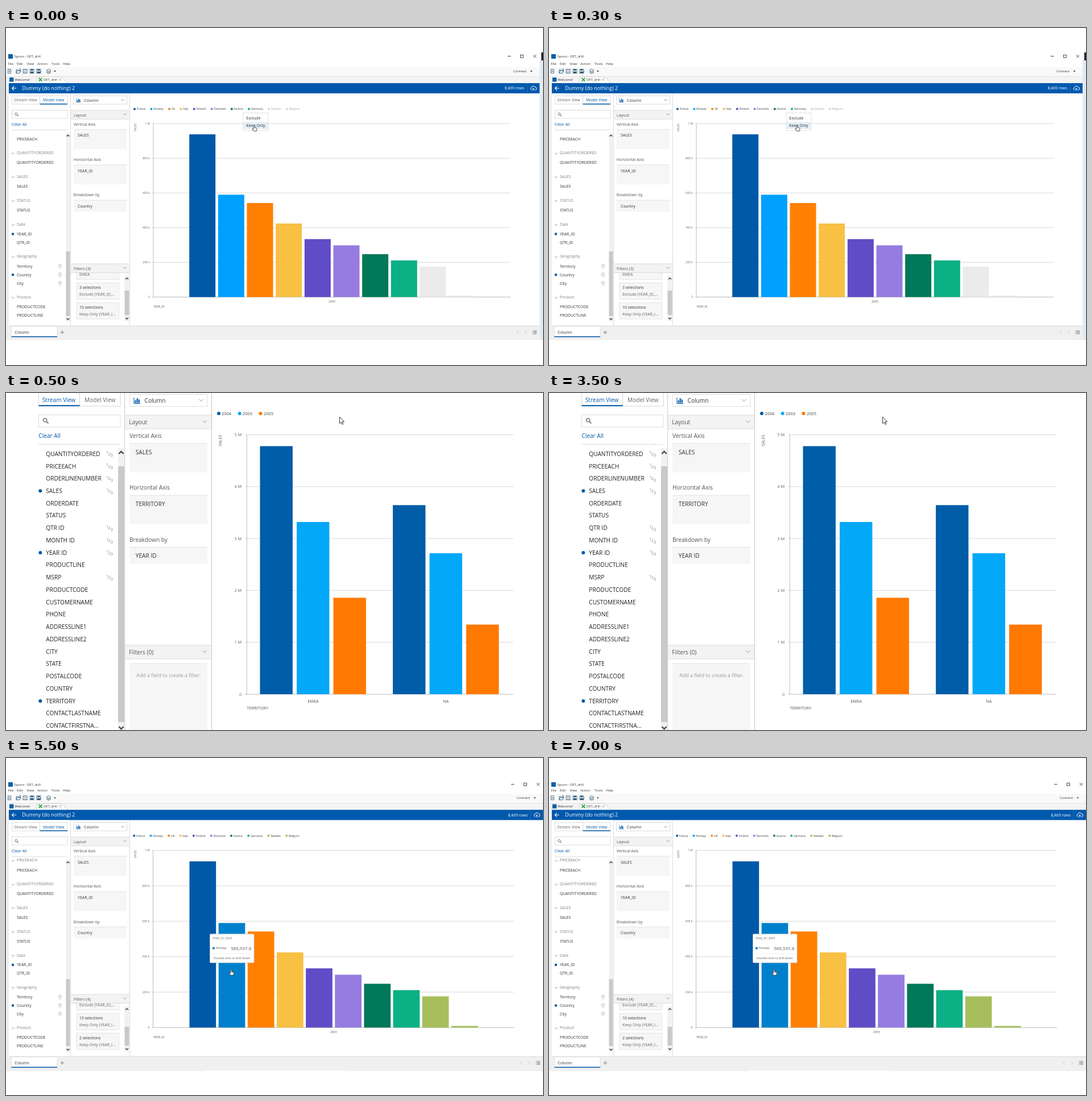
Recreate the animation shown at these times as an HTML page. Size 944 px wide and 593 px high, loop 8000 ms.

```html
<!DOCTYPE html>
<html lang="en">
<head>
<meta charset="utf-8">
<title>Chart drill-down</title>
<style>
html, body { margin: 0; width: 100%; height: 100%; overflow: hidden; background: #fff; }
svg { display: block; width: 100%; height: 100%; }
text { font-family: "Open Sans", "Noto Sans", sans-serif; white-space: pre; }
</style>
</head>
<body>
<svg id="stage" viewBox="0 0 944 593"></svg>
<script>
const BLUE = '#0058a8', INK = '#333', GRAY = '#777', RULE = '#d4d4d4', PANEL = '#f6f6f6';

// Drawing helpers; text is placed by the middle of its capitals.
const rect = (x, y, w, h, fill, stroke = 'none', r = 0) =>
  `<rect x="${x}" y="${y}" width="${w}" height="${h}" rx="${r}" fill="${fill}" stroke="${stroke}" stroke-width=".8"/>`;
const path = (d, stroke = GRAY, width = 1, fill = 'none') =>
  `<path d="${d}" fill="${fill}" stroke="${stroke}" stroke-width="${width}"/>`;
const hline = (x1, x2, y, color = RULE, w = .8) => path(`M${x1} ${y}H${x2}`, color, w);
const vline = (x, y1, y2, color = RULE, w = .8) => path(`M${x} ${y1}V${y2}`, color, w);
const dot = (x, y, r, fill = BLUE) => `<circle cx="${x}" cy="${y}" r="${r}" fill="${fill}"/>`;
const text = (x, y, s, size = 7, fill = INK, anchor = 'start', extra = '') =>
  `<text x="${x}" y="${y + size * .357}" font-size="${size}" fill="${fill}" text-anchor="${anchor}" ${extra}>${s}</text>`;
const upText = (x, y, s, size) =>
  text(x, y, s, size, '#666', 'middle', `transform="rotate(-90 ${x} ${y})"`);
const chevron = (x, y, r, up = 1, color = GRAY, w = .8) =>
  path(`M${x - r} ${y - r * up / 2}L${x} ${y + r * up / 2}L${x + r} ${y - r * up / 2}`, color, w);
const at = (x, y, scale, body) => `<g transform="translate(${x} ${y}) scale(${scale})">${body}</g>`;

const magnifier = (x, y, k) => at(x, y, k,
  '<circle cx="-.6" cy="-.6" r="2.1" fill="none" stroke="#777"/>' + path('M1 1L3.4 3.4', GRAY, 1.2));
const chartIcon = (x, y, k) => at(x, y, k, path('M-4 -4V3.6H4', BLUE, .7) +
  rect(-2.8, -.5, 1.5, 3.4, BLUE) + rect(-.6, -3, 1.5, 5.9, BLUE) + rect(1.6, -1.5, 1.5, 4.4, BLUE));
const pin = (x, y) => path(`M${x} ${y + 4}C${x - 5} ${y - 2} ${x - 2} ${y - 3.6} ${x} ${y - 3.6}S${x + 5} ${y - 2} ${x} ${y + 4}Z`, '#aaa', .7) +
  `<circle cx="${x}" cy="${y - .9}" r="1" fill="none" stroke="#aaa" stroke-width=".6"/>`;
const hand = (x, y) => at(x, y, 1, path(
  'M-1.8 1V-4.5Q-.8 -6 .2 -4.5V-1.2L3.2 -.6Q4.2 -.2 4 1L3.2 4.8H-1.5L-4 1.4Q-3.8 -.4 -1.8 1Z', '#222', .8, '#fff'));

function scrollbar(x, w, top, bottom, thumbTop, thumbBottom, k) {
  return rect(x, top, w, bottom - top, '#f1f1f1') + rect(x, thumbTop, w, thumbBottom - thumbTop, '#c9c9c9') +
    chevron(x + w / 2, top + 5 * k, 2.6 * k, -1, '#444', 1.4 * k) +
    chevron(x + w / 2, bottom - 5 * k, 2.6 * k, 1, '#444', 1.4 * k);
}

function grid(left, right, top, base, labels, size, unit) {
  const step = (base - top) / (labels.length - 1);
  return labels.map((s, i) => {
    const y = base - i * step;
    return hline(left - unit, right, y, i ? '#d0d0d0' : '#aaa') +
      text(left - unit * 2 - 2, y, s, size, '#666', 'end');
  }).join('') + vline(left, top, base, '#aaa');
}

// Layout pane shared by both zoom levels: rows are [label, field, label y, box height].
function dropZones(x, w, rows, size, gap) {
  return rows.map(([label, field, y, h]) => {
    const top = y + size * 1.3;
    return text(x, y, label, size, '#555') + rect(x, top, w, h, PANEL) + hline(x, x + w, top, '#ddd') +
      text(x + gap, top + size * 1.5, field, size);
  }).join('');
}

function paneHeader(x, w, top, h, label, size) {
  return rect(x, top, w, h, '#f3f3f3') + hline(x, x + w, top) + hline(x, x + w, top + h) +
    text(x + size * .72, top + h / 2 + .5, label, size, '#555') + chevron(x + w - size * 1.15, top + h / 2 - .8, size * .37);
}

const FIELDS = [ // [label, y, kind]: h header, d dot, p pin
  ['PRICEEACH', 178, 'h'], ['PRICEEACH', 195.3, ''], ['QUANTITYORDERED', 220, 'h'], ['QUANTITYORDERED', 237, ''],
  ['SALES', 261.7, 'h'], ['SALES', 279, ''], ['STATUS', 303.5, 'h'], ['STATUS', 321, ''],
  ['Date', 345.6, 'h'], ['YEAR_ID', 362.5, 'd'], ['QTR_ID', 377.5, ''], ['Geography', 402, 'h'],
  ['Territory', 419.3, 'p'], ['Country', 434.3, 'dp'], ['City', 449.2, 'p'], ['Product', 473.7, 'h'],
  ['PRODUCTCODE', 490.6, ''], ['PRODUCTLINE', 505.5, '']];
const COUNTRIES = [ // [name, legend x, color]
  ['France', 226, BLUE], ['Norway', 255.3, '#00a0ff'], ['UK', 287, '#ff8000'], ['Italy', 307.3, '#f8c144'],
  ['Finland', 330.7, '#604cc6'], ['Denmark', 361.6, '#967be0'], ['Austria', 396.8, '#007859'],
  ['Germany', 427, '#0bb084'], ['Sweden', 462, '#a6bf5c'], ['Belgium', 494, '#a6bf5c']];
const VALUES = [938, 590, 542, 424, 334, 298, 247, 211, 176, 9];

function fieldList(map) {
  return FIELDS.map(([label, y0, kind]) => {
    const y = map(y0), header = kind === 'h';
    return text(19, y, label, 6.9, header ? '#808080' : INK) +
      (header ? chevron(12.5, y + .8, 2.3) : '') +
      (kind.includes('d') ? dot(12, y, 2.2) : '') + (kind.includes('p') ? pin(95, y) : '');
  }).join('');
}

function filterCards(cards, first) {
  return cards.map(([title, detail], i) => {
    const y = first + i * 34.8;
    return rect(124, y, 74.5, 29, PANEL, '#dedede') + text(129, y + 8.2, title, 6.9) + text(129, y + 20.2, detail, 6.9, '#666');
  }).join('');
}

function toolbar(y) {
  const c = '#2b5878', sheet = (x, w = 6, h = 7) => rect(x - w / 2, y - h / 2, w, h, '#fff', c);
  return sheet(6, 5) + path(`M4.5 ${y}h3M6 ${y - 1.5}v3`, c, .8) +
    path(`M18 ${y + 3.5}v-6h2.5l1 1h3v2M18 ${y + 3.5}l2-4.5h6l-2 4.5zM23 ${y - 4}h2.5v2`, c, .9) +
    sheet(33.6, 7) + [-2, 0, 2].map(d => hline(31, 36, y + d, '#777', .7)).join('') +
    [45.6, 57.4].map(x => rect(x - 3.5, y - 3.5, 7, 7, '#fff', c) + rect(x - 2, y - 3.5, 4, 2.5, c) + rect(x - 2.5, y + .5, 5, 3, c)).join('') +
    path(`M59 ${y + 4}l3-4`, c, 1) +
    path(`M71 ${y - 1.5}l4-2.2l4 2.2l-4 2.2zM71 ${y + .4}l4 2.2l4-2.2M71 ${y + 2.2}l4 2.2l4-2.2`, c, .8) +
    path(`M84 ${y - 1}h4l-2 2.4z`, 'none', 0, INK);
}

function windowFrame(o) {
  const { top, title, menu, right } = o, tools = top + 76, tabs = top + 90.8, bar = top + 97;
  const shift = right - 938, buttons = title - .3;
  return rect(0, title - 7, 944, o.bottom - title + 7, '#fff') +
    rect(0, tools - 7, right, 15, '#f9f9f9') + rect(0, tabs - 6, right, 13, '#f4f4f4') +
    rect(4, title - 4, 8, 8, '#0b5fa5') + text(14.5, title, 'Spoon - DET_drill', 5.9) +
    hline(882 + shift, 887.5 + shift, buttons, '#222', .9) +
    rect(904.5 + shift, buttons - 2.3, 4.8, 4.8, 'none', '#222') +
    path(`M${927 + shift} ${buttons - 2.5}l5 5m0 -5l-5 5`, '#222', .8) +
    [['File', 3.5], ['Edit', 19], ['View', 36.5], ['Action', 55.3], ['Tools', 80], ['Help', 100]]
      .map(([s, x]) => text(x, menu, s, 6)).join('') +
    toolbar(tools) + text(892 + shift, tools - .3, 'Connect', 6) +
    path(`M${921.5 + shift} ${tools - 1}h4l-2 2.4z`, 'none', 0, INK) +
    hline(0, right, tabs - 5.5, '#ddd') +
    path(`M54 ${tabs + 6}V${tabs - 5}H96Q101 ${tabs - 4} 104 ${tabs + 2}L108 ${tabs + 6}`, '#bbb', .7, '#fff') +
    rect(6, tabs - 3.7, 7.4, 7.4, '#0b5fa5') + text(15.3, tabs, 'Welcome!', 5.9) +
    path(`M57.5 ${tabs - 3}l6 6m0-6l-6 6`, '#2fa84f', 1.8) + text(66, tabs, 'DET_drill', 5.9) +
    path(`M93.5 ${tabs - 2}l4 4m0-4l-4 4`, '#999', .9) +
    rect(5, bar, right - 5, 18, '#0059ad') +
    path(`M18 ${bar + 9}H10.5m3.5-3.5l-3.5 3.5l3.5 3.5`, '#fff', 1.1) +
    text(28.3, bar + 9, 'Dummy (do nothing) 2', 8.9, '#fff') +
    vline(right - 22, bar, bar + 18, '#2f78bd', .7) +
    text(right - 27, bar + 9, '8,469 rows', 6.9, '#fff', 'end') +
    at(right - 11, bar + 9, 1, path('M-2.5 3H-3.5A2.4 2.4 0 0 1 -3 -1.5A3.2 3.2 0 0 1 3 -2A2.5 2.5 0 0 1 3.5 3H2.5M0 4.5V0M-1.8 1.7L0 0L1.8 1.7', '#fff', 1));
}

function appScene(o) {
  const { top, right, low, chart } = o, listTop = top + 179.5, foot = 524 + low, filterTop = 415 + low;
  const step = chart.step, scale = (chart.base - chart.top) / 1000;
  let s = windowFrame(o);

  s += fieldList(o.map) + rect(5, top + 115, 108, 64.5, '#fff') + hline(10, 108, listTop) +
    scrollbar(105.5, 7, listTop + 5, 517 + low, o.thumb, 507, 1) +
    rect(10.5, top + 119.5, 97.5, 14.5, '#fff', RULE) + vline(59.5, top + 119.5, top + 134) +
    text(14.3, top + 127, 'Stream View', 7, '#666') + text(65, top + 127, 'Model View', 7, BLUE) +
    hline(59.5, 108, top + 133.8, BLUE, 1.4) +
    rect(10.5, top + 144.5, 97.5, 14.5, '#fff', RULE) + magnifier(18.5, top + 152, 1) +
    text(10, top + 169.5, 'Clear All', 7, BLUE);

  s += filterCards(o.cards, 413.5 + low) + rect(114, foot - 9, 94, 8, '#fff') + rect(114, 320 + top, 103, filterTop - 320 - top, '#fff') +
    scrollbar(208.5, 8, 436 + low, 516 + low, o.filterThumb, 505 + low, 1) +
    rect(118.5, top + 119.5, 94, 14.5, '#fff', RULE) + chartIcon(127.5, top + 127.3, .95) +
    text(137, top + 127.3, 'Column', 7) + chevron(205, top + 126.8, 2.6) +
    paneHeader(114, 103, top + 145, 15.3, 'Layout', 7) +
    dropZones(118.7, 93.5, [['Vertical Axis', 'SALES', top + 169.5, 34.5],
      ['Horizontal Axis', 'YEAR_ID', top + 231.8, 34.5], ['Breakdown by', 'Country', top + 294, 20]], 6.95, 7.3) +
    paneHeader(114, 103, filterTop, 15.5, o.filters, 7) +
    vline(113.5, top + 115, foot) + vline(217.5, top + 115, foot);

  s += COUNTRIES.map(([name, x, color], i) => {
    const off = o.dimmed && i > 7, y = top + 142.6, lx = x + chart.legend;
    return dot(lx, y, 2, off ? '#d4d4d4' : color) + text(lx + 3.7, y, name, 4.95, off ? '#aaa' : '#444');
  }).join('') + upText(227.5, top + 175, 'SALES', 5) +
    grid(259 + chart.left, right - 51, chart.top, chart.base, ['0', '200 k', '400 k', '600 k', '800 k', '1 M'], 5.1, 2) +
    COUNTRIES.map(([, , color], i) => {
      const h = VALUES[i] * scale, fill = o.dimmed && i > 7 ? '#ebebeb' : i === o.hover ? '#0080cc' : color;
      return rect(chart.x + i * step, chart.base - h, chart.barWidth, h, fill);
    }).join('') +
    text(chart.mid, chart.base + 8, '2003', 5.2, '#555', 'middle') + text(259.5 + chart.left, chart.base + 16.5, 'YEAR_ID', 5, '#555');

  s += rect(0, top + 97, 5, o.bottom - top - 97, '#f0f0f0') + rect(0, foot, right, o.bottom - foot, '#f0f0f0') + hline(5, right, foot) +
    rect(9.5, foot + 1, 80.5, 19, '#fff', '#ddd') + hline(9.5, 90, foot + 19.3, BLUE, 1.6) +
    text(15.3, foot + 11.5, 'Column', 7) + path(`M95.5 ${foot + 11.5}h6.6m-3.3-3.3v6.6`, GRAY, .9) +
    path(`M${right - 37} ${foot + 8.5}l-3 3l3 3M${right - 26} ${foot + 8.5}l3 3l-3 3`, '#bbb', .8) +
    [-2.5, 0, 2.5].map(d => hline(right - 12.5, right - 11.3, foot + 11.5 + d, '#666', 1) + hline(right - 10.5, right - 5, foot + 11.5 + d, '#666', 1)).join('');
  return s + o.overlay;
}

const contextMenu = rect(417, 149.5, 44, 31, '#fff', '#d8d8d8') + rect(417.5, 165.5, 43, 12, '#e2edf6') +
  text(422.3, 158.5, 'Exclude', 7) + text(422.3, 171.5, 'Keep Only', 7) + hand(437, 176.5);
const tooltip = rect(358.5, 309.8, 77.5, 50.5, '#fff', '#ccc', 1.5) +
  text(363, 317.3, 'YEAR_ID: 2003', 5.2, '#666') + dot(365, 334.7, 2.1, '#0080cc') +
  text(369, 334.7, 'Norway:', 5, '#555') + text(431.3, 334.7, '589,597.8', 8, '#555', 'end') +
  hline(362, 432, 344.5, '#eee') + text(365, 352.3, 'Double-click to drill down', 5.45, '#666') + hand(396.5, 377.5);

const dimmedScene = () => appScene({
  top: 0, title: 50, menu: 62.5, right: 938, bottom: 549, low: 0, map: y => y, thumb: 393, filterThumb: 462,
  filters: 'Filters (3)', dimmed: true,
  cards: [['', 'EMEA'], ['3 selections', 'Exclude (YEAR_ID,...'], ['10 selections', 'Keep Only (YEAR_I...']],
  chart: { top: 168.2, base: 473.4, left: 0, legend: 0, x: 322.2, step: 50.65, barWidth: 46, mid: 573 },
  overlay: rect(938, 57, 6, 492, '#e2eaf2') + rect(941, 43, 3, 14, '#1c222b') + contextMenu
});

const hoverScene = () => appScene({
  top: -5.8, title: 46.6, menu: 57.3, right: 944, bottom: 551, low: 1, map: y => y + 2 - (y - 178) * .0031, thumb: 389, filterThumb: 473,
  filters: 'Filters (4)', hover: 1,
  cards: [['', 'Exclude (YEAR_ID,...'], ['10 selections', 'Keep Only (YEAR_I...'], ['2 selections', 'Keep Only (YEAR_I...']],
  chart: { top: 162.5, base: 474.3, left: -.5, legend: -.8, x: 322.5, step: 51.15, barWidth: 46.7, mid: 575.8 },
  overlay: tooltip + hline(350, 598, 550.3, '#fff', 1.2)
});

function zoomedScene() {
  const size = 10.15, fields = ['', 'QUANTITYORDERED', 'PRICEEACH', 'ORDERLINENUMBER', 'SALES', 'ORDERDATE', 'STATUS', 'QTR ID',
    'MONTH ID', 'YEAR ID', 'PRODUCTLINE', 'MSRP', 'PRODUCTCODE', 'CUSTOMERNAME', 'PHONE', 'ADDRESSLINE1', 'ADDRESSLINE2',
    'CITY', 'STATE', 'POSTALCODE', 'COUNTRY', 'TERRITORY', 'CONTACTLASTNAME', 'CONTACTFIRSTNA...'];
  const numeric = [0, 1, 2, 3, 4, 7, 8, 9, 11], used = [4, 9, 21], colors = ['#005da8', '#04a8f8', '#ff7900'];
  let s = rect(0, 0, 944, 593, '#fff');

  s += fields.map((name, i) => {
    const y = 85.4 + i * 21.74;
    return text(70.3, y, name, size, '#222') + (used.includes(i) ? dot(60.3, y, 3) : '') +
      (numeric.includes(i) ? text(176, y - 2.2, '1', 7, '#888') + text(179.5, y, '2', 7.5, '#888') + text(183.5, y + 2.5, '3', 8, '#888') : '');
  }).join('') + rect(57, 0, 150, 90, '#fff') + hline(57, 201, 90.3) +
    scrollbar(197, 11, 97, 597, 129, 579, 1.6) +
    path('M57.5 0V23H201V0M129.5 0V23', RULE, 1) + hline(57.5, 129.5, 22.3, BLUE, 2) +
    text(63.8, 12.7, 'Stream View', size, BLUE) + text(138, 12.7, 'Model View', size, '#666') +
    rect(57.5, 38.5, 143.5, 21.5, '#fff', RULE) + magnifier(69.5, 48.7, 1.45) + text(57.3, 75.5, 'Clear All', size, BLUE);

  s += rect(217.3, 2.5, 136.7, 21.2, '#fff', RULE) + chartIcon(230.5, 13.5, 1.4) + text(243.5, 13.7, 'Column', size) +
    chevron(343, 12.7, 3.8) + paneHeader(209, 152, 39, 24, 'Layout', size) +
    dropZones(217, 137, [['Vertical Axis', 'SALES', 75.5, 51], ['Horizontal Axis', 'TERRITORY', 166.8, 51],
      ['Breakdown by', 'YEAR ID', 258, 29]], size, 10.8) +
    paneHeader(209, 152, 444, 24, 'Filters (0)', size) +
    rect(217, 476, 137, 117, PANEL) + hline(217, 354, 476, '#ddd') +
    text(229.3, 497, 'Add a field to create a filter.', 8.85, '#999') +
    vline(208.7, 0, 593, '#ccc', 1) + vline(361.5, 0, 593, '#ccc', 1.2);

  s += ['2004', '2003', '2005'].map((year, i) =>
    dot(374 + i * 36.7, 36, 3, colors[i]) + text(379.2 + i * 36.9, 36, year, 7.4, '#444')).join('') +
    upText(376, 83.5, 'SALES', 7.3) +
    grid(423.3, 892, 73.4, 530, ['0', '1 M', '2 M', '3 M', '4 M', '5 M'], 7.4, 3.5) +
    [93.5, 227, 360.3, 197.3, 282, 407.5].map((y, i) =>
      rect(446.5 + i % 3 * 64.5 + (i > 2 ? 233.5 : 0), y, 57.4, 530 - y, colors[i % 3])).join('') +
    text(540, 542, 'EMEA', 7.4, '#555', 'middle') + text(773, 542, 'NA', 7.4, '#555', 'middle') +
    text(423.3, 554, 'TERRITORY', 7.4, '#555') +
    path('M586.5 42V53.7L589.2 51.3L591 55.4L592.8 54.6L591 50.6H594.5Z', '#222', .9, '#fff');
  return s;
}

const LOOP = 8000, starts = [0, 500, 5500];
const stage = document.getElementById('stage');
stage.innerHTML = [dimmedScene, zoomedScene, hoverScene].map(draw => `<g>${draw()}</g>`).join('');
const scenes = [...stage.children];
const origin = performance.now();

function render() {
  const time = (performance.now() - origin) % LOOP;
  const current = starts.filter(start => start <= time).length - 1;
  scenes.forEach((scene, i) => scene.style.display = i === current ? '' : 'none');
  requestAnimationFrame(render);
}
render();
</script>
</body>
</html>
```
